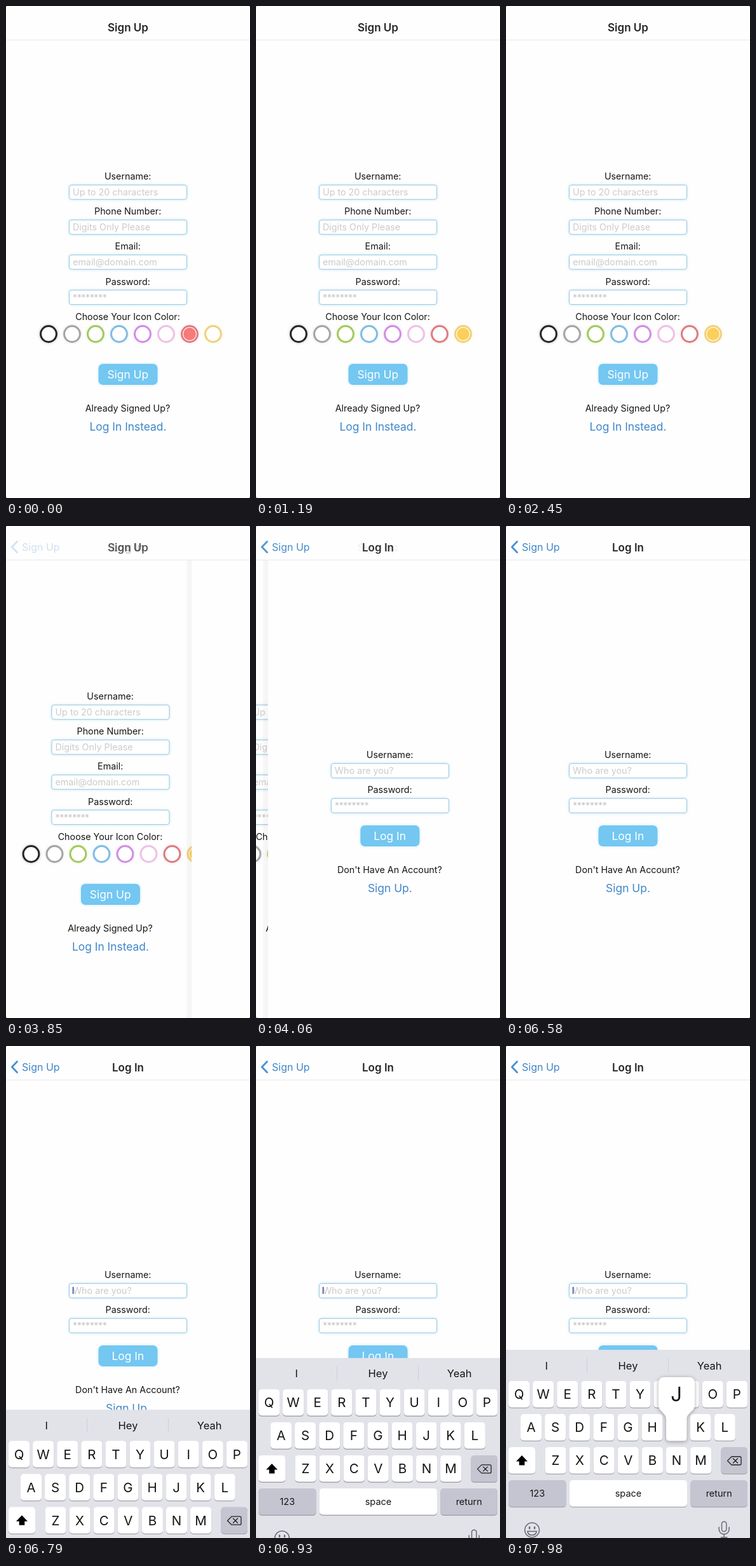
Animation of 384 by 774 pixels, one loop 8 s. Source, as an HTML page:

```html
<!DOCTYPE html>
<html lang="en">
<head>
<meta charset="utf-8">
<title>Sign Up</title>
<style>
  html, body { margin: 0; width: 100%; height: 100%; overflow: hidden; background: #888; }
  svg { display: block; width: 384px; height: 774px; border-radius: 3px; background: #fefefe; }
  text { font-family: Inter, "Open Sans", sans-serif; fill: #151515; white-space: pre; }
  .mid { text-anchor: middle; }
  .title { font-weight: 600; fill: #262626; }
  .hint { fill: #cbcbcd; }
  .stars { fill: #c8c4c8; letter-spacing: -.5px; }
  .link { fill: #3f86c9; }
  .white { fill: #fff; }
  .field { fill: #fff; stroke: #9cc6dd; filter: drop-shadow(0 0 2px #c3e6f5); }
  .button { fill: #73c7f1; filter: drop-shadow(0 0 2px #c4e8fa); }
  .key { fill: #fff; }
  .dark { fill: #c4c5d1; }
  .edge { fill: #a4a5ac; }
  .line { fill: none; stroke-linecap: round; stroke-linejoin: round; }
  #bubble path { fill: #fff; filter: drop-shadow(0 1px 3px #0005); }
</style>
</head>
<body>
<svg viewBox="0 0 384 774">
  <defs>
    <linearGradient id="shade">
      <stop offset="0" stop-color="#000" stop-opacity=".025"/>
      <stop offset="1" stop-color="#000" stop-opacity=".04"/>
    </linearGradient>
  </defs>
  <g id="signup"></g>
  <g id="login">
    <rect x="-8" y="54" width="8" height="720" fill="url(#shade)"/>
    <rect y="54" width="384" height="720" fill="#fefefe"/>
  </g>
  <g id="header">
    <rect width="384" height="53" fill="#fefefe"/>
    <rect y="53" width="384" height="1" fill="#e9e9e9"/>
    <g id="oldTitle"></g>
    <g id="newTitle">
      <path class="line" d="M17.5 24.5 L9.3 33 L17.5 41.5" stroke="#4a90d2" stroke-width="2.8"/>
    </g>
  </g>
  <g id="keyboard">
    <rect width="384" height="300" fill="#e2e2e9"/>
    <path d="M127.5 13V36M255.5 13V36" stroke="#cfd0d8"/>
  </g>
</svg>
<script>
const LOOP = 8000, PICK = 1100, PUSH = 3800, FOCUS = 6662, PRESS = 7900;
const KEYBOARD_TOP = 478;
const $ = id => document.getElementById(id);

function add(parent, tag, attrs, content = '') {
  const el = document.createElementNS('http://www.w3.org/2000/svg', tag);
  for (const name in attrs) el.setAttribute(name, attrs[name]);
  el.textContent = content;
  parent.append(el);
  return el;
}

// y is the middle of the capital letters
const text = (parent, str, x, y, size, cls) =>
  add(parent, 'text', { x, y: y + size * .364, 'font-size': size, class: cls }, str);

const box = (parent, x, y, width, height, rx, cls) =>
  add(parent, 'rect', { x, y, width, height, rx, class: cls });

function field(page, label, y, hint) {
  const stars = hint[0] === '*';
  text(page, label, 191.7, y, 14.3, 'mid');
  box(page, 99.5, y + 13.7, 185, 22.5, 3.5, 'field');
  text(page, hint, 105, y + 25, 14.3, stars ? 'stars' : 'hint');
}

function footer(page, button, y, question, link) {
  box(page, 145.5, y - 16.5, 93, 33, 7, 'button');
  text(page, button, 191.8, y, 17.4, 'mid white');
  text(page, question, 191.5, y + 53.5, 14.3, 'mid');
  text(page, link, 192, y + 82, 17.4, 'mid link');
}

// Sign-up page
const signup = $('signup'), login = $('login');
field(signup, 'Username:', 268, 'Up to 20 characters');
field(signup, 'Phone Number:', 323, 'Digits Only Please');
field(signup, 'Email:', 378, 'email@domain.com');
field(signup, 'Password:', 433.3, '********');
text(signup, 'Choose Your Icon Color:', 191.5, 489, 14.3, 'mid');
const rings = ['#262626', '#a4a4a7', '#a3c95c', '#7fbce0', '#d08de4', '#edc1e6', '#de7b80', '#f1d078'];
rings.forEach((stroke, i) => add(signup, 'circle', {
  cx: 67 + 37 * i, cy: 516, r: 12.4, fill: '#fff', stroke, 'stroke-width': 3,
  style: `filter: drop-shadow(0 0 2px ${stroke}55)`
}));
const dot = add(signup, 'circle', { cy: 516, r: 9.9 });
footer(signup, 'Sign Up', 579.5, 'Already Signed Up?', 'Log In Instead.');

// Log-in page
field(login, 'Username:', 360, 'Who are you?');
field(login, 'Password:', 415, '********');
footer(login, 'Log In', 487.5, "Don't Have An Account?", 'Sign Up.');
const caret = add(login, 'rect', { x: 104.6, y: 379, width: 2, height: 11, fill: '#5c6cb0' });

// Header
text($('oldTitle'), 'Sign Up', 192, 33.5, 17, 'mid title');
text($('newTitle'), 'Log In', 192, 33.5, 17, 'mid title');
text($('newTitle'), 'Sign Up', 25, 33.5, 16, 'link');

// Keyboard
const board = $('keyboard');
function key(x, y, width, label, size, cls = 'key') {
  box(board, x, y + 1, width, 42, 5, 'edge');
  box(board, x, y, width, 41.7, 5, cls);
  text(board, label, x + width / 2, y + 21, size, 'mid');
}
['I', 'Hey', 'Yeah'].forEach((word, i) => text(board, word, 63.8 + 128.2 * i, 24.5, 16.5, 'mid'));
[['QWERTYUIOP', 4], ['ASDFGHJKL', 23], ['ZXCVBNM', 61.5]].forEach(([letters, x], row) =>
  [...letters].forEach((c, i) => key(x + 38.1 * i, 49 + 52 * row, 33, c, 20.5)));
key(4, 153, 42, '', 0);
key(338.5, 153, 41.5, '', 0, 'dark');
key(4, 205, 90.5, '123', 14.5, 'dark');
key(100, 205, 185, 'space', 14.5);
key(290.5, 205, 89.5, 'return', 14.5, 'dark');

const line = (d, stroke = '#686a72', width = 1.5) =>
  add(board, 'path', { d, stroke, 'stroke-width': width, class: 'line' });
add(board, 'path', { d: 'M25 166 L34 175.5 H29.3 V181.5 H20.7 V175.5 H16 Z' });
line('M355 168 H368 Q370 168 370 170 V179 Q370 181 368 181 H355 L348.5 174.5 Z M357.5 171 L364.5 178 M364.5 171 L357.5 178', '#222', 1.3);
add(board, 'circle', { cx: 41, cy: 283.5, r: 11.4, fill: 'none', stroke: '#686a72', 'stroke-width': 1.5 });
line('M33.8 285.5 H48.2 Q47 291.5 41 291.5 Q35 291.5 33.8 285.5 Z');
line('M37 279 V281 M45 279 V281', '#686a72', 2.4);
line('M339.5 274 a3.7 3.7 0 0 1 7.4 0 V282 a3.7 3.7 0 0 1 -7.4 0 Z M335.2 279 V282 a8 8 0 0 0 16 0 V279 M343.2 290 V295 M338.5 295 H348');

const bubble = add(board, 'g', { id: 'bubble' });
add(bubble, 'path', { d: 'M249 43 h39 q9 0 9 9 v35 c0 10 -12.5 12 -12.5 22 v29.5 q0 5 -5 5 h-22.5 q-5 0 -5 -5 v-29.5 c0 -10 -12 -12 -12 -22 v-35 q0 -9 9 -9 z' });
text(bubble, 'J', 268, 70, 31, 'mid');

// Critically damped spring, 0 to 1
function spring(ms) {
  const x = Math.max(0, ms) / 1000 * Math.sqrt(1000 / 3);
  return 1 - (1 + x) * Math.exp(-x);
}
const shift = (el, x, y) => el.setAttribute('transform', `translate(${x} ${y})`);
const show = (el, on) => el.setAttribute('opacity', +on);

function draw(t) {
  const picked = t >= PICK;
  dot.setAttribute('cx', picked ? 326 : 289);
  dot.setAttribute('fill', picked ? '#fccf5a' : '#f67a77');

  const push = spring(t - PUSH);
  shift(signup, -115.2 * push, 0);
  shift(login, 384 * (1 - push), 0);
  show(login, push > 0);
  show($('oldTitle'), 1 - push);
  show($('newTitle'), push);

  const rise = spring(t - FOCUS);
  shift(board, 0, 774 - (774 - KEYBOARD_TOP) * rise);
  show(board, rise > 0);
  show(caret, t > FOCUS && (t - FOCUS) % 1000 < 600);
  show(bubble, t >= PRESS);
}

function tick() {
  draw(performance.now() % LOOP);
  requestAnimationFrame(tick);
}
tick();
</script>
</body>
</html>
```
